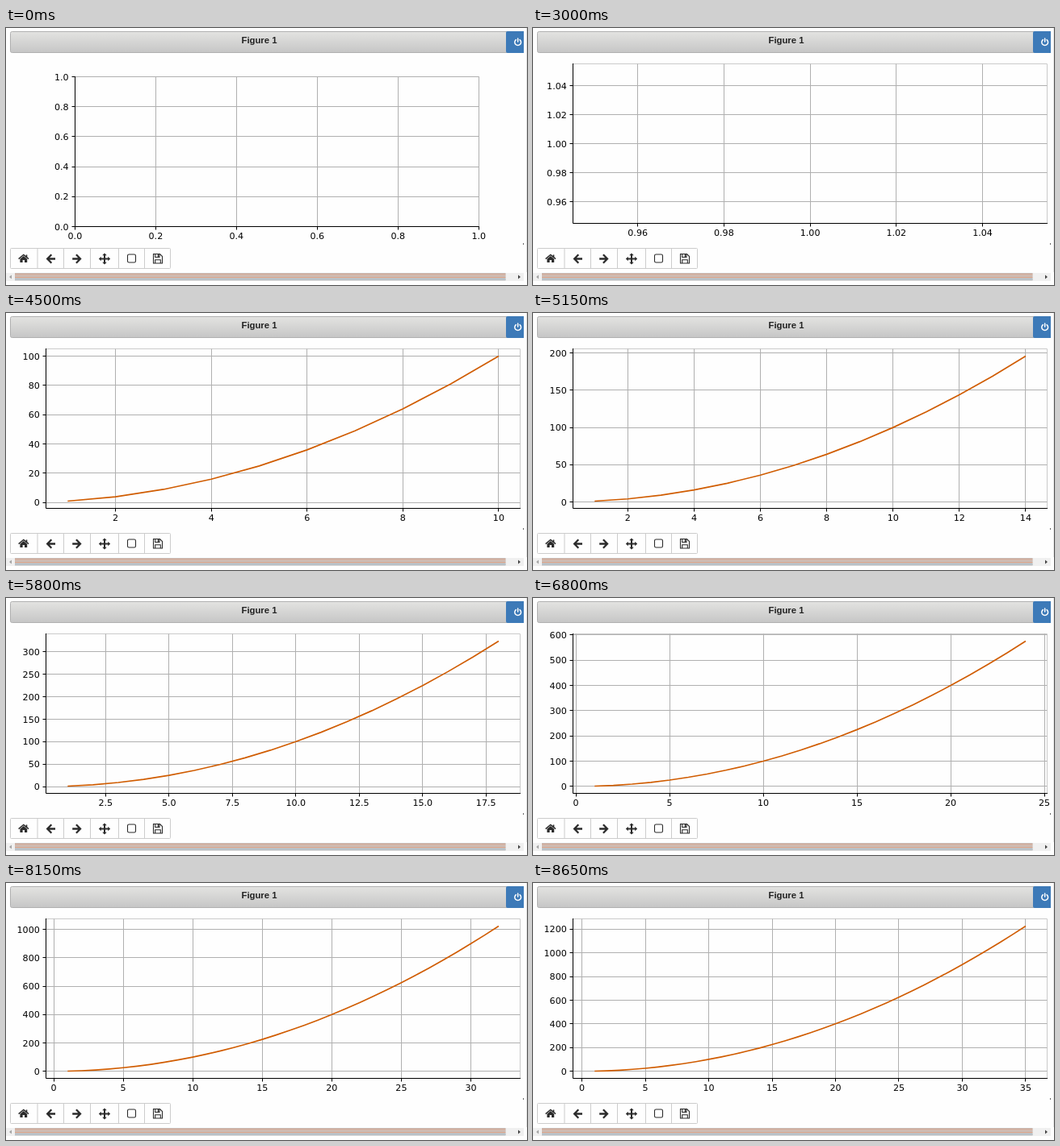
Animation of 645 by 319 pixels, one loop 8730 ms. Source, as an HTML page:

```html
<!DOCTYPE html>
<html lang="en">
<head>
<meta charset="utf-8">
<title>Figure 1</title>
<style>
  html, body { margin: 0; width: 100%; height: 100%; overflow: hidden; background: #fefefe; }
  svg { display: block; }
  #plot text { font: 11.1px "DejaVu Sans", sans-serif; fill: #000; }
  .title { font: bold 11.3px "Liberation Sans", Arial, sans-serif; fill: #222; }
</style>
</head>
<body>
<svg width="645" height="319" viewBox="0 0 645 319">
  <defs>
    <linearGradient id="bar" x1="0" y1="0" x2="0" y2="1">
      <stop offset="0" stop-color="#e3e3e1"/>
      <stop offset="1" stop-color="#c6c6c6"/>
    </linearGradient>
  </defs>
  <rect width="645" height="319" fill="#fefefe"/>
  <path d="M644.5 0V303" stroke="#e6e6e6"/>

  <!-- title bar -->
  <path d="M641 4.500H7.500Q5.500 4.500 5.500 6.500V28.500Q5.500 30.500 7.500 30.500H641" fill="url(#bar)" stroke="#b0b0b0"/>
  <text class="title" x="313.500" y="19" text-anchor="middle">Figure 1</text>
  <path d="M641 4H621Q619 4 619 6V29Q619 31 621 31H641Z" fill="#3d7ab8"/>
  <g fill="none" stroke="#fff" stroke-width="1.500" stroke-linecap="round">
    <path d="M631.300 14.600A3.900 3.900 0 1 0 636.100 14.600"/>
    <path d="M633.700 13V17"/>
  </g>

  <g id="plot"></g>
  <rect x="640" y="267" width="1" height="2" fill="#666"/>

  <!-- toolbar -->
  <rect x="5.500" y="273.500" width="198" height="25" rx="1" fill="#fefefe" stroke="#ccc"/>
  <path d="M39 274V298M71.500 274V298M104.500 274V298M139.500 274V298M171.500 274V298" stroke="#ccc"/>
  <g fill="#2b2b2b">
    <path d="M17.400 286.700L21.800 283L26.200 286.700V291H23V287.900H20.600V291H17.400Z"/>
    <path d="M15.600 286.600L21.800 281.400L28 286.600" fill="none" stroke="#2b2b2b" stroke-width="1.400"/>
    <path d="M24.600 281.500H26.300V285H24.600Z"/>
    <g id="arrow" fill="none" stroke="#2b2b2b" stroke-width="2.300">
      <path d="M56.300 281.300L51.200 286.500L56.300 291.700M51.500 286.500H61"/>
    </g>
    <use href="#arrow" transform="matrix(-1 0 0 1 143.200 0)"/>
    <path d="M121 282.200H119.200L122 279.400L124.800 282.200H123V285.500H126.300V283.700L129.100 286.500L126.300 289.300V287.500H123V290.800H124.800L122 293.600L119.200 290.800H121V287.500H117.700V289.300L114.900 286.500L117.700 283.700V285.500H121Z"/>
  </g>
  <g fill="none" stroke="#2b2b2b" stroke-width="1.100">
    <rect x="150.500" y="281" width="10" height="10" rx="1.800"/>
    <path d="M182.500 280.500H190.500L193.500 283.500V292H182.500Z"/>
    <path d="M184.700 280.500V284.500H190V280.500M184.700 292V287.700H191.300V292"/>
    <path d="M188.500 281V284" stroke-width="1.500"/>
  </g>

  <!-- scroll bar -->
  <rect y="304" width="641" height="10" fill="#f0f0f0"/>
  <rect x="11" y="304" width="607.500" height="9.500" fill="#c2c0c0"/>
  <path d="M11 305.500H618.500M11 309.500H618.500" stroke="#e0a487"/>
  <path d="M11 307.500H618.500" stroke="#dcb5a2"/>
  <path d="M11 312H618.500" stroke="#b8c1c8" stroke-width="2"/>
  <path d="M7 306.500V311.500L4 309Z" fill="#a3a3a3"/>
  <path d="M634 306.500V311.500L637 309Z" fill="#444"/>
</svg>
<script>
const LOOP = 8730, LAST = 35;
const plot = document.getElementById("plot");

// Moment at which each number of points appears.
const starts = [0, 3000];
for (let n = 1; n < LAST; n++) {
  const hold = n === 1 ? 110 : n === 8 ? 190 : n % 3 ? 150 : 200;
  starts.push(starts[n] + hold);
}

const snap = v => Math.floor(v) + 0.5;
const path = (d, color, width = 1) =>
  `<path d="${d}" fill="none" stroke="${color}" stroke-width="${width}"/>`;
const label = (x, y, anchor, s) =>
  `<text x="${x.toFixed(2)}" y="${y.toFixed(2)}" text-anchor="${anchor}">${s}</text>`;

function limits(n, max) {
  if (n === 0) return [0, 1];
  if (n === 1) return [0.945, 1.055];
  const pad = 0.05 * (max - 1);
  return [1 - pad, max + pad];
}

// Smallest round step that leaves at most the given number of bins.
function ticks([lo, hi], bins) {
  const raw = (hi - lo) / bins;
  const unit = 10 ** Math.floor(Math.log10(raw));
  const step = unit * [1, 2, 2.5, 5, 10].find(m => m * unit >= raw - 1e-9);
  let digits = 0;
  while (Math.abs(step * 10 ** digits - Math.round(step * 10 ** digits)) > 1e-6) digits++;
  const list = [];
  for (let i = Math.ceil(lo / step - 1e-9); i <= Math.floor(hi / step + 1e-9); i++)
    list.push({ v: i * step, s: (i * step).toFixed(digits) });
  return list;
}

function draw(n) {
  const [l, r, t, b] = n ? [49.6, 636.6, 44.5, 242.5] : [85.4, 585.3, 60.5, 246.5];
  const xr = limits(n, n), yr = limits(n, n * n);
  const px = v => l + (v - xr[0]) / (xr[1] - xr[0]) * (r - l);
  const py = v => b - (v - yr[0]) / (yr[1] - yr[0]) * (b - t);
  const L = snap(l), R = snap(r), T = snap(t), B = snap(b);
  let grid = "", marks = "", text = "", curve = "";

  for (const { v, s } of ticks(xr, 9)) {
    const x = snap(px(v));
    grid += `M${x} ${T}V${B}`;
    marks += `M${x} ${B}v4`;
    text += label(px(v), b + 15.9, "middle", s);
  }
  for (const { v, s } of ticks(yr, 8)) {
    const y = snap(py(v));
    grid += `M${L} ${y}H${R}`;
    marks += `M${L} ${y}h-4`;
    text += label(l - 7.8, py(v) + 4.1, "end", s);
  }
  for (let i = 1; i <= n; i++)
    curve += `${i > 1 ? "L" : "M"}${px(i).toFixed(2)} ${py(i * i).toFixed(2)}`;

  plot.innerHTML =
    path(`M${L} ${T}H${R}V${B}`, "#cacaca") +
    path(grid, "#b0b0b0") +
    (n > 1 ? path(curve, "#d05c00", 1.67) : "") +
    path(`M${L} ${T - 0.5}V${B}H${R + 0.5}${marks}`, "#000") +
    text;
}

let shown = -1;
function frame(now) {
  const t = now % LOOP;
  let n = LAST;
  while (starts[n] > t) n--;
  if (n !== shown) draw(shown = n);
  requestAnimationFrame(frame);
}
draw(shown = 0);
requestAnimationFrame(frame);
</script>
</body>
</html>
```
